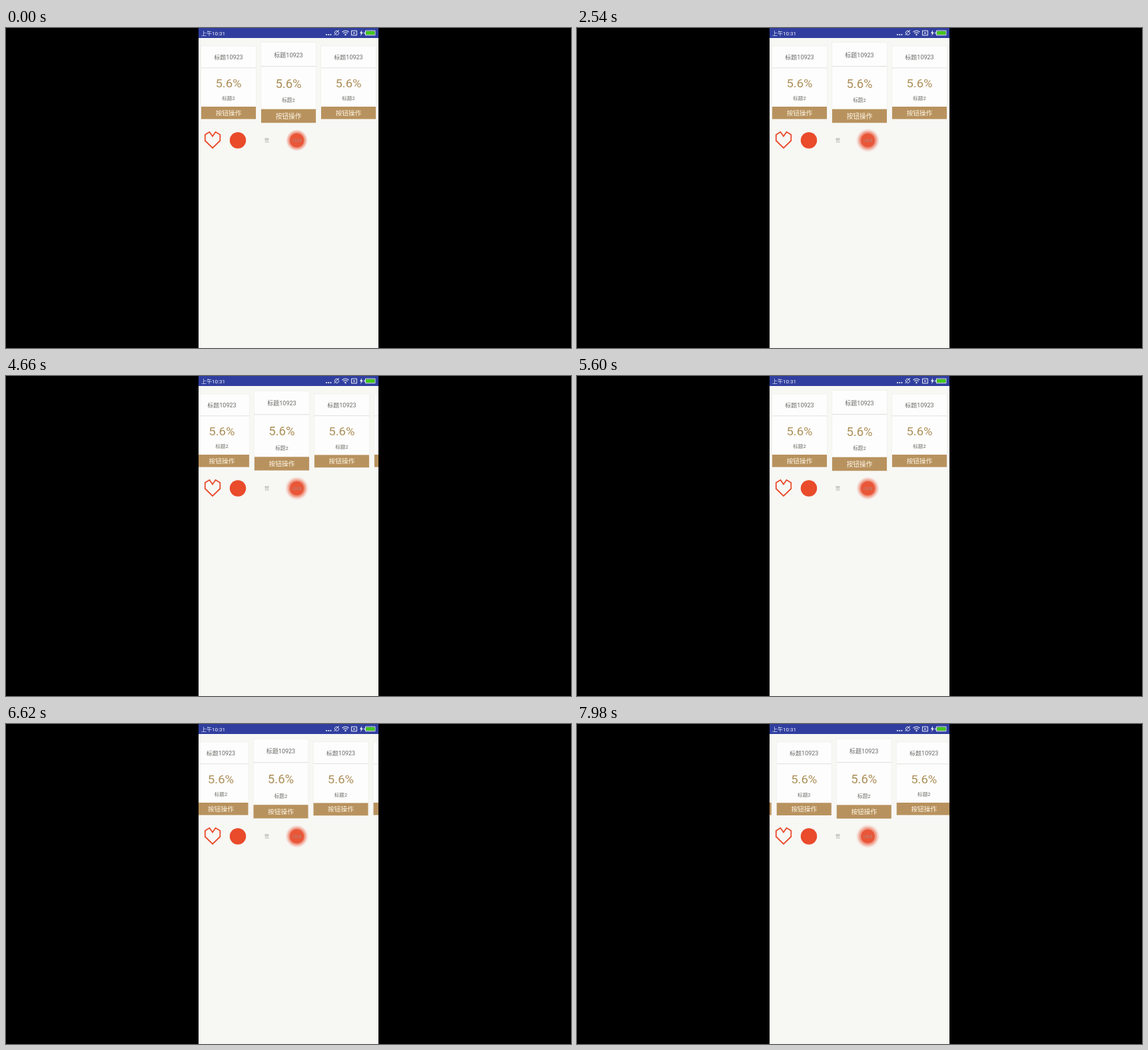
An HTML page with a canvas that plays this animation: 848 px wide and 480 px high, repeating every 8 s.

```html
<!DOCTYPE html>
<html lang="zh">
<head>
<meta charset="utf-8">
<style>
html, body { margin: 0; width: 100%; height: 100%; overflow: hidden; background: #000; }
canvas { display: block; }
</style>
</head>
<body>
<canvas id="stage" width="848" height="480"></canvas>
<script>
const ctx = document.getElementById('stage').getContext('2d');
const LOOP = 8000;
const FONT = 'Roboto, "Noto Sans CJK SC", "Noto Sans CJK", sans-serif';
const PHONE = { x: 289, w: 270 };
const CARD = { width: 82, spacing: 90, centerX: 424, centerY: 82.5 };
const SWIPE_STARTS = [4557, 5776, 6509, 7565];
const SWIPE_MS = 500;
const ORANGE = '#e94b2b';

function rect(x, y, w, h, color) {
  ctx.fillStyle = color;
  ctx.fillRect(x, y, w, h);
}

function text(value, x, y, size, color, align = 'center') {
  ctx.font = `${size}px ${FONT}`;
  ctx.textAlign = align;
  ctx.fillStyle = color;
  ctx.fillText(value, x, y);
}

function disc(x, y, r, color) {
  ctx.fillStyle = color;
  ctx.beginPath();
  ctx.arc(x, y, r, 0, Math.PI * 2);
  ctx.fill();
}

function stroke(path, color, width) {
  ctx.strokeStyle = color;
  ctx.lineWidth = width;
  ctx.stroke(new Path2D(path));
}

function smooth(p) {
  const x = Math.min(1, Math.max(0, p));
  return x * x * (3 - 2 * x);
}

function drawStatusBar() {
  rect(PHONE.x, 0, PHONE.w, 15, '#303f9f');
  text('上午10:31', 293, 10.5, 8, '#f4f6fa', 'left');
  for (const x of [481, 484.2, 487.4]) disc(x, 10, 1, '#fff');

  const white = '#e8ecf4';
  stroke('M493.5 8.5a3 3 0 0 1 5.5-2.5M499.5 6.5a3 3 0 0 1-5 3M492.5 11l7.5-8', white, 1);
  stroke('M504.5 6q5-4 10 0M506.3 8q3.2-2.5 6.4 0', white, 1.1);
  disc(509.5, 10, 1.2, white);
  stroke('M518.5 4h8v7h-8zM520.7 5.8l3.6 3.6M524.3 5.8l-3.6 3.6', white, 1);
  ctx.fillStyle = white;
  ctx.fill(new Path2D('M534 3l-3 5h2l-1 4 4-5.5h-2.2z'));
  stroke('M539.5 4h14.5v6.8h-14.5zM538 6v3', white, 1);
  rect(540.2, 4.8, 13.2, 5.2, '#45c81c');
}

function drawCard(x) {
  const distance = Math.min(1, Math.abs(x - CARD.centerX) / CARD.spacing);
  const left = -CARD.width / 2;
  ctx.save();
  ctx.translate(x, CARD.centerY);
  ctx.scale(1, 1 - 0.095 * distance);
  rect(left - 1, -61.5, CARD.width + 2, 122, '#f1f1ee');
  rect(left, -60.5, CARD.width, 121, '#fdfdfd');
  rect(left, -25.5, CARD.width, 1, '#dededa');
  text('标题10923', 0, -39, 9, '#696966');
  text('5.6%', 0, 7, 18.5, '#ac8f58');
  text('标题2', 0, 28.7, 7.6, '#6c6c68');
  rect(left, 39.2, CARD.width, 20.6, '#b8925e');
  text('按钮操作', 0, 53.3, 9.7, '#fff8ea');
  ctx.restore();
}

function drawRipple(t) {
  for (let wave = 0; wave < 3; wave++) {
    const p = (t / 1600 + wave / 3) % 1;
    disc(436.5, 168.5, 11 + 6.5 * p, `rgba(233, 75, 43, ${0.42 * (1 - p) + 0.08})`);
  }
  disc(436.5, 168.5, 10.5, '#e95638');
  text('click', 437, 171, 7, '#b5857a');
}

function draw(t) {
  rect(0, 0, 848, 480, '#000');
  rect(PHONE.x, 0, PHONE.w, 480, '#f7f7f4');
  ctx.save();
  ctx.beginPath();
  ctx.rect(PHONE.x, 0, PHONE.w, 480);
  ctx.clip();
  drawStatusBar();

  const page = SWIPE_STARTS.reduce((sum, start) => sum + smooth((t - start) / SWIPE_MS), 0);
  for (let i = Math.floor(page) - 2; i <= page + 2; i++) {
    drawCard(CARD.centerX + CARD.spacing * (i - page));
  }

  stroke('M310 162.5L305.5 156L298.8 160V169L310 180L321.3 169V160L314.5 156Z', ORANGE, 1.8);
  disc(348, 168.5, 12.2, ORANGE);
  text('赞', 391.5, 171, 7, '#a3a3a0');
  drawRipple(t);
  ctx.restore();
}

function tick() {
  draw(performance.now() % LOOP);
  requestAnimationFrame(tick);
}
tick();
</script>
</body>
</html>
```
